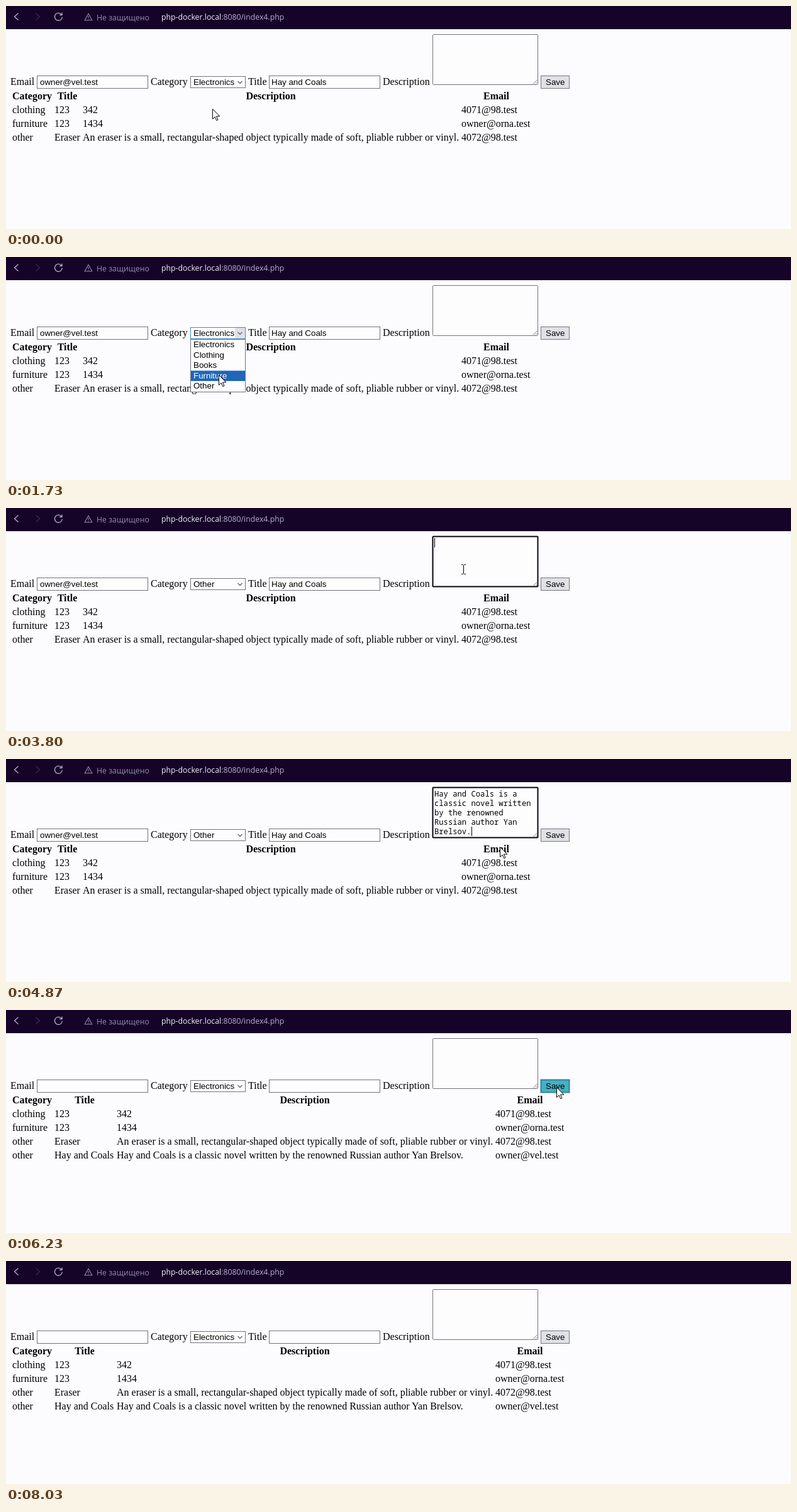
An HTML page for the animation above (8.81 s loop, 1248 px wide and 356 px high).

```html
<!DOCTYPE html>
<html lang="en">
<head>
<meta charset="utf-8">
<style>
  html, body { margin: 0; width: 100%; height: 100%; overflow: hidden; background: #fcfcfe; }
  svg { display: block; font: 16px "Liberation Serif", serif; }
  .bar { font: 12.3px "Open Sans", sans-serif; }
  .ui { font: 13.333px "Liberation Sans", sans-serif; }
  .mono { font: 12.2px "Noto Sans Mono", monospace; }
  .bold { font-weight: bold; }
  .mid { text-anchor: middle; }
  .box { fill: #fdfdfe; stroke: #72727a; }
  .line { fill: none; stroke: #bbaed0; stroke-width: 1.3; }
  .line .dim { stroke: #382c4c; }
  .line .warn { stroke: #988bb0; stroke-width: 1.1; }
  #select.hover .box { stroke: #3d8fc0; }
  #select:not(.hover) #arrow { display: none; }
  #save .box { fill: #e0e0e7; stroke: #76767c; }
  #save.hover .box { fill: #44b0c2; stroke: #2c82a4; stroke-width: 2; }
  #area.focus .box { stroke: #08040c; stroke-width: 2; }
  .item rect { fill: none; }
  .item.on rect { fill: #1f67b8; }
  .item.on text { fill: #fff; }
</style>
</head>
<body>
<svg width="1248" height="356" viewBox="0 0 1248 356">
  <rect width="1248" height="37" fill="#150328"/>
  <g class="line">
    <path d="M19.5 11.5L13.5 17l6 5.5"/>
    <path class="dim" d="M47.5 11.5l6 5.5-6 5.5"/>
    <path d="M88.2 13.6A6 6 0 1 0 89.4 17.5M89 10.5v3.8h-4"/>
    <path class="warn" d="M131 12.3l5.8 10.4h-11.6zM131 16v3.3M131 20.4v1.2"/>
  </g>
  <g class="bar">
    <text x="144" y="23" fill="#988bb0">Не защищено</text>
    <text x="247" y="22" fill="#bbaed0"><tspan fill="#f6f0fc">php-docker.local</tspan>:8080/index4.php</text>
  </g>

  <text x="7" y="126">Email</text>
  <text x="230" y="126">Category</text>
  <text x="385" y="126">Title</text>
  <text x="599" y="126">Description</text>
  <rect class="box" x="49.5" y="111.5" width="176" height="20"/>
  <rect class="box" x="418.5" y="111.5" width="176" height="20"/>
  <g id="filled" class="ui">
    <text x="54" y="126">owner@vel.test</text>
    <text x="422" y="126">Hay and Coals</text>
  </g>

  <g id="area">
    <rect class="box" x="678.5" y="45.5" width="167" height="80" rx="1"/>
    <path d="M838 124.5l6.5-6.5M842 124.5l2.5-2.5" stroke="#77777e"/>
    <g id="note" class="mono"></g>
    <path id="caret" d="M.5 0v15" stroke="#000"/>
  </g>

  <g id="save" class="ui">
    <rect class="box" x="850.5" y="111.5" width="45" height="20"/>
    <text x="858" y="126">Save</text>
  </g>

  <g id="before"></g>
  <g id="after"></g>

  <g id="select" class="ui">
    <rect class="box" x="293.5" y="112.5" width="87" height="18"/>
    <rect id="arrow" x="364" y="113" width="16" height="17" fill="#e0e0e7"/>
    <path d="M368.5 120l3.5 3.5 3.5-3.5" fill="none" stroke="#66666e" stroke-width="1.4"/>
    <text id="choice" x="298" y="126"></text>
  </g>
  <g id="menu" class="ui">
    <rect class="box" x="293.5" y="131.5" width="87" height="84"/>
  </g>

  <path id="pointer" d="M.5.5V16.5L4.2 13l2.5 5.7 2.3-1-2.5-5.6H11.8Z" fill="#fff" stroke="#000"/>
  <path id="beam" d="M-3.5-7.5h2.5l1 1 1-1h2.5M0-6.5v13M-3.5 7.5h2.5l1-1 1 1h2.5" fill="none" stroke="#000"/>
</svg>
<script>
const LOOP = 8810;
const OPEN = 1030, PICK = 1930, FOCUS = 3600, PASTE = 4430, CLICK = 5670, RELOAD = 6170;
const BLINK = 530, ITEM = 16.5, MENU_TOP = 132;
const $ = id => document.getElementById(id);
const choices = ['Electronics', 'Clothing', 'Books', 'Furniture', 'Other'];
const note = ['Hay and Coals is a', 'classic novel written', 'by the renowned', 'Russian author Yan', 'Brelsov.'];
const rows = [
  ['clothing', '123', '342', '4071@98.test'],
  ['furniture', '123', '1434', 'owner@orna.test'],
  ['other', 'Eraser', 'An eraser is a small, rectangular-shaped object typically made of soft, pliable rubber or vinyl.', '4072@98.test'],
  ['other', 'Hay and Coals', note.join(' '), 'owner@vel.test'],
];

// Pointer stops: time, x, y
const path = [
  [30, 328, 164], [570, 304, 125], [OPEN, 304, 125], [1730, 338, 188], [1900, 342, 203],
  [2470, 342, 203], [3370, 727, 98], [4700, 727, 98], [5070, 858, 193], [5270, 858, 193],
  [5640, 884, 122], [RELOAD, 884, 122], [6930, 392, 196], [7040, 385, 199], [7900, 300, 360],
];

const label = (x, y, text, cls = '') => `<text x="${x}" y="${y}" class="${cls}">${text}</text>`;

function table(id, columns, centers, count) {
  const heads = ['Category', 'Title', 'Description', 'Email']
    .map((head, i) => label(centers[i], 149, head, 'bold mid'));
  const cells = rows.slice(0, count)
    .flatMap((row, r) => row.map((cell, i) => label(columns[i], 171 + 22 * r, cell)));
  $(id).innerHTML = heads.concat(cells).join('');
}

table('before', [10, 77, 122, 724], [41.5, 97.5, 421, 779.5], 3);
table('after', [10, 77, 176, 778], [41.5, 125, 475, 833], 4);
$('note').innerHTML = note.map((line, i) => label(681, 60 + 15 * i, line)).join('');
$('menu').innerHTML += choices.map((name, i) => {
  const y = MENU_TOP + ITEM * i;
  return `<g class="item"><rect x="294" y="${y}" width="86" height="${ITEM}"/>${label(298, Math.round(y + 12), name)}</g>`;
}).join('');
const items = document.querySelectorAll('.item');

function pointerAt(t) {
  const next = path.findIndex(stop => stop[0] > t);
  if (next < 1) return (next ? path[path.length - 1] : path[0]).slice(1);
  const [t0, x0, y0] = path[next - 1], [t1, x1, y1] = path[next];
  const u = (t - t0) / (t1 - t0), ease = u * u * (3 - 2 * u);
  return [x0 + (x1 - x0) * ease, y0 + (y1 - y0) * ease].map(Math.round);
}

const show = (id, on) => $(id).style.display = on ? '' : 'none';
const move = (id, x, y) => $(id).setAttribute('transform', `translate(${x} ${y})`);

function draw() {
  const t = performance.now() % LOOP;
  const [x, y] = pointerAt(t);
  const over = (left, top, right, bottom) => x >= left && x < right && y >= top && y < bottom;
  const open = t >= OPEN && t < PICK;
  const saved = t >= RELOAD;
  const pasted = t >= PASTE && !saved;
  const focused = t >= FOCUS && t < CLICK;
  const typing = over(678, 45, 846, 126);

  show('before', !saved);
  show('after', saved);
  show('filled', !saved);
  show('note', pasted);

  show('menu', open);
  const active = Math.max(0, Math.floor((y - MENU_TOP) / ITEM));
  items.forEach((item, i) => item.classList.toggle('on', i === active));
  $('choice').textContent = choices[t >= PICK && !saved ? 4 : 0];
  $('select').classList.toggle('hover', open || over(293, 112, 381, 131));
  $('save').classList.toggle('hover', over(850, 111, 896, 132));

  $('area').classList.toggle('focus', focused);
  const sinceEdit = t - (pasted ? PASTE : FOCUS);
  show('caret', focused && Math.floor(sinceEdit / BLINK) % 2 === 0);
  move('caret', pasted ? 740 : 681, pasted ? 108 : 48);

  show('pointer', !typing);
  show('beam', typing);
  move('pointer', x, y);
  move('beam', x + .5, y);
  requestAnimationFrame(draw);
}
draw();
</script>
</body>
</html>
```
